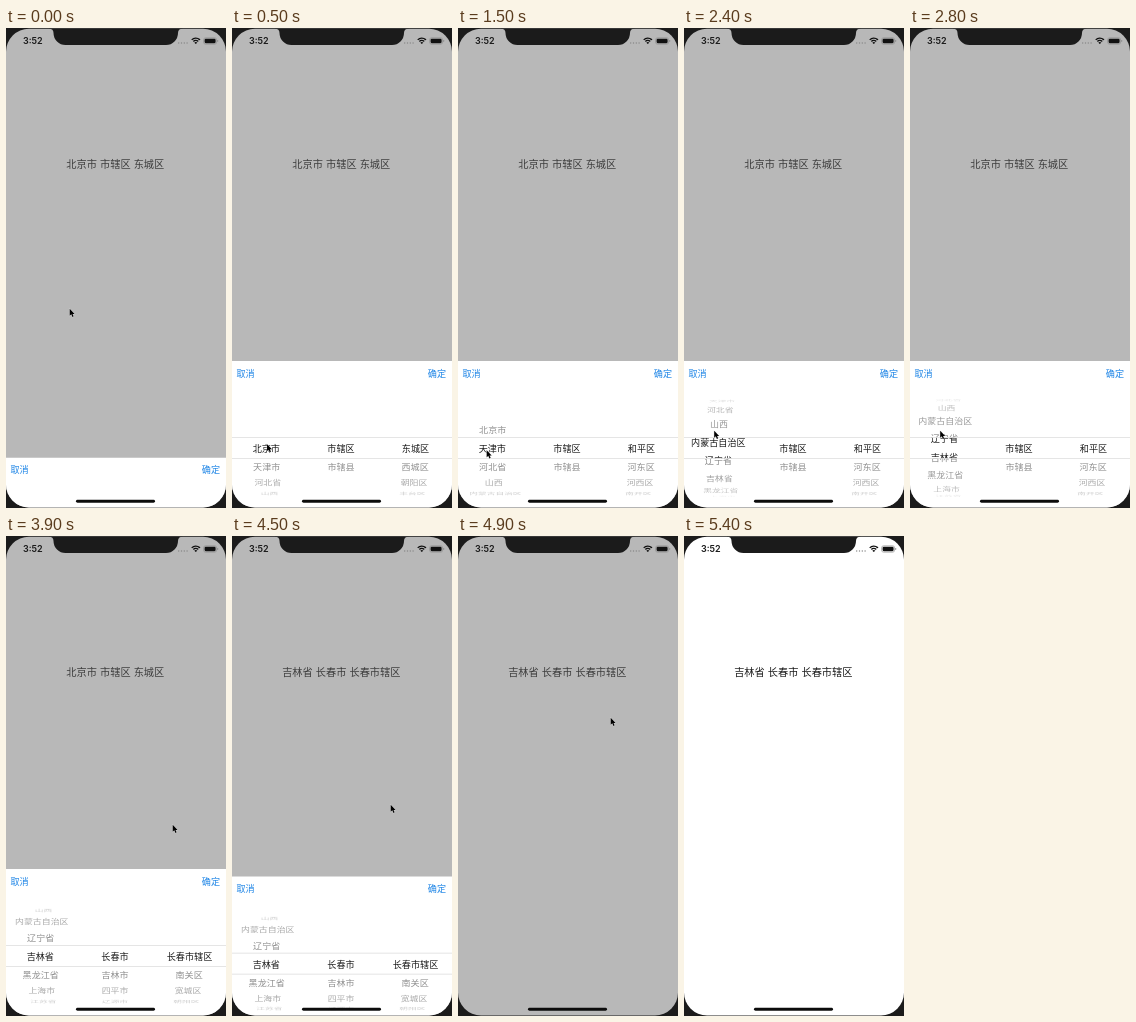
An HTML page with a canvas that plays this animation: 220x480 px, repeating every 6000 ms.

```html
<!DOCTYPE html>
<html lang="zh-CN">
<head>
<meta charset="utf-8">
<style>
  html, body { margin: 0; width: 100%; height: 100%; overflow: hidden; background: #1b1b1b; }
  canvas { display: block; }
</style>
</head>
<body>
<canvas id="stage" width="220" height="480"></canvas>
<script>
const ctx = document.getElementById('stage').getContext('2d');
const CJK = '"Noto Sans CJK SC", "Noto Sans CJK", sans-serif';
const LOOP = 6000, STEP = 100;
const SHEET_TOP = 333, SHEET_HEIGHT = 147;
const RADIUS = 49.5, ROW_ANGLE = 0.385, CENTER_X = 109;

const provinces = ['北京市', '天津市', '河北省', '山西', '内蒙古自治区', '辽宁省', '吉林省',
  '黑龙江省', '上海市', '江苏省', '浙江省', '安徽省'];
const municipality = ['市辖区', '市辖县'];
const beijing = [municipality, ['东城区', '西城区', '朝阳区', '丰台区', '石景山区']];
const tianjin = [municipality, ['和平区', '河东区', '河西区', '南开区', '河北区']];
const jilin = [['长春市', '吉林市', '四平市', '辽源市', '通化市'],
  ['长春市辖区', '南关区', '宽城区', '朝阳区', '二道区']];

// time, x, y of the pointer tip
const pointerPath = [
  [0, 63, 280], [300, 45, 370], [600, 29, 438], [750, 28, 440], [1000, 28, 421.5],
  [1500, 28, 421.5], [1700, 29, 423], [1900, 29, 421], [2100, 29.5, 402], [3000, 29.5, 402],
  [3200, 160, 328], [3300, 176, 310], [3700, 170, 298], [3800, 170, 298], [4100, 158, 268],
  [4500, 158, 268], [4900, 152, 181], [5100, 158, 237], [5300, 139, 459]
];

const clamp = u => Math.min(1, Math.max(0, u));
const smooth = u => (u = clamp(u), u * u * (3 - 2 * u));

function pointerAt(t) {
  const i = pointerPath.findIndex(p => p[0] > t);
  if (i < 0) return pointerPath[pointerPath.length - 1].slice(1);
  const [t0, x0, y0] = pointerPath[i - 1], [t1, x1, y1] = pointerPath[i];
  const u = (t - t0) / (t1 - t0);
  return [x0 + (x1 - x0) * u, y0 + (y1 - y0) * u];
}

// One-row drag, then a flick that decays onto the seventh row
function scrollAt(t) {
  if (t < 1800) return smooth((t - 700) / 450);
  if (t < 2100) return 1 + 0.87 * ((t - 1800) / 300) ** 2;
  return t < 3600 ? 6 - 4.13 * Math.exp((2100 - t) / 331) : 6;
}

function text(str, x, y, size, color, align = 'center', font = CJK, weight = 400) {
  ctx.font = `${weight} ${size}px ${font}`;
  ctx.textAlign = align;
  ctx.fillStyle = color;
  ctx.fillText(str, x, y + size * 0.43);
}

function box(x, y, w, h, r, color) {
  ctx.fillStyle = color;
  ctx.beginPath();
  ctx.roundRect(x, y, w, h, r);
  ctx.fill();
}

function clipped(y, h, draw) {
  ctx.save();
  ctx.beginPath();
  ctx.rect(0, y, 220, h);
  ctx.clip();
  draw();
  ctx.restore();
}

function wheel(rows, x, y, scroll, selected) {
  rows.forEach((name, i) => {
    const angle = (i - scroll) * ROW_ANGLE;
    if (Math.abs(angle) > 1.5) return;
    const c = Math.cos(angle), depth = 0.93 + 0.07 * c;
    ctx.save();
    ctx.translate(CENTER_X + (x - CENTER_X) * depth, y + RADIUS * Math.sin(angle));
    ctx.scale(depth, c);
    text(name, 0, 0, 9.1, selected ? '#1a1a1a' : `rgba(0,0,0,${0.48 * c})`);
    ctx.restore();
  });
}

function sheet(t) {
  const shown = t < 4000 ? smooth((t + 177) / 450) : 1 - smooth((t - 4438) / 450);
  const top = SHEET_TOP + SHEET_HEIGHT * (1 - shown);
  box(0, top, 220, 480 - top, 0, '#fff');
  text('取消', 4.4, top + 11.6, 9.1, '#1c84e6', 'left');
  text('确定', 214, top + 11.6, 9.1, '#1c84e6', 'right');

  const y = top + 87, scroll = scrollAt(t);
  const [cities, districts] = t < 1200 ? beijing : t < 3600 ? tianjin : jilin;
  const wheels = selected => {
    wheel(provinces, 34.3, y, scroll, selected);
    wheel(cities, 109, y, 0, selected);
    wheel(districts, 183.5, y, 0, selected);
  };
  clipped(y - 49, 38.5, () => wheels(false));
  clipped(y + 10.5, 38.5, () => wheels(false));
  clipped(y - 10.5, 21, () => wheels(true));
  box(0, y - 10.8, 220, 0.8, 0, '#dcdcdc');
  box(0, y + 10.2, 220, 0.8, 0, '#dcdcdc');
}

function statusBar() {
  text('3:52', 17, 12.4, 9, '#1a1a1a', 'left', 'Inter, sans-serif', 600);
  for (let i = 0; i < 4; i++) box(172 + i * 2.8, 14.3, 1.4, 1.4, 0.7, '#888');
  ctx.strokeStyle = '#111';
  ctx.lineWidth = 1.4;
  for (const r of [5.6, 3.3]) {
    ctx.beginPath();
    ctx.arc(189.8, 15.7, r, -Math.PI * 0.76, -Math.PI * 0.24);
    ctx.stroke();
  }
  ctx.fillStyle = '#111';
  ctx.beginPath();
  ctx.moveTo(189.8, 16);
  ctx.arc(189.8, 16, 2, -Math.PI * 0.76, -Math.PI * 0.24);
  ctx.fill();
  ctx.strokeStyle = '#888';
  ctx.lineWidth = 0.6;
  ctx.beginPath();
  ctx.roundRect(197.6, 9.8, 13, 6.4, 2);
  ctx.stroke();
  box(198.6, 10.8, 11, 4.4, 1.1, '#111');
  box(211.3, 12, 0.9, 2, 0.4, '#888');
}

function pointer(x, y) {
  ctx.save();
  ctx.translate(x + 0.7, y + 0.8);
  ctx.scale(0.85, 0.85);
  const shape = new Path2D('M0 0V8.2L1.9 6.5L3.2 9.5L4.6 8.9L3.3 6H5.8Z');
  ctx.lineJoin = 'round';
  ctx.strokeStyle = '#ddd';
  ctx.lineWidth = 0.9;
  ctx.stroke(shape);
  ctx.fillStyle = '#000';
  ctx.fill(shape);
  ctx.restore();
}

const notch = new Path2D('M43 0V.7Q47.5 .7 47.5 5A12 12 0 0 0 59.5 17H160A12 12 0 0 0 172 5Q172 .7 176.5 .7V0Z');

function draw(t) {
  box(0, 0, 220, 480, 0, '#1b1b1b');
  ctx.save();
  ctx.beginPath();
  ctx.roundRect(0, 0.7, 220, 478.7, 23);
  ctx.clip();
  const open = t < 5000;
  box(0, 0, 220, 480, 0, open ? '#b8b8b8' : '#fff');
  ctx.wordSpacing = '0.8px';
  text(t < 4500 ? '北京市 市辖区 东城区' : '吉林省 长春市 长春市辖区', 109.3, 135.6, 10.2,
    open ? '#3c3c3c' : '#1a1a1a');
  ctx.wordSpacing = '0px';
  statusBar();
  if (open) sheet(t);
  box(70, 471.8, 79, 2.9, 1.45, '#0c0c0c');
  ctx.fillStyle = '#1b1b1b';
  ctx.fill(notch);
  if (t < 5400) pointer(...pointerAt(t));
  ctx.restore();
}

const start = performance.now();
function frame() {
  const t = (performance.now() - start) % LOOP;
  draw(Math.floor(t / STEP) * STEP);
  requestAnimationFrame(frame);
}
frame();
</script>
</body>
</html>
```
